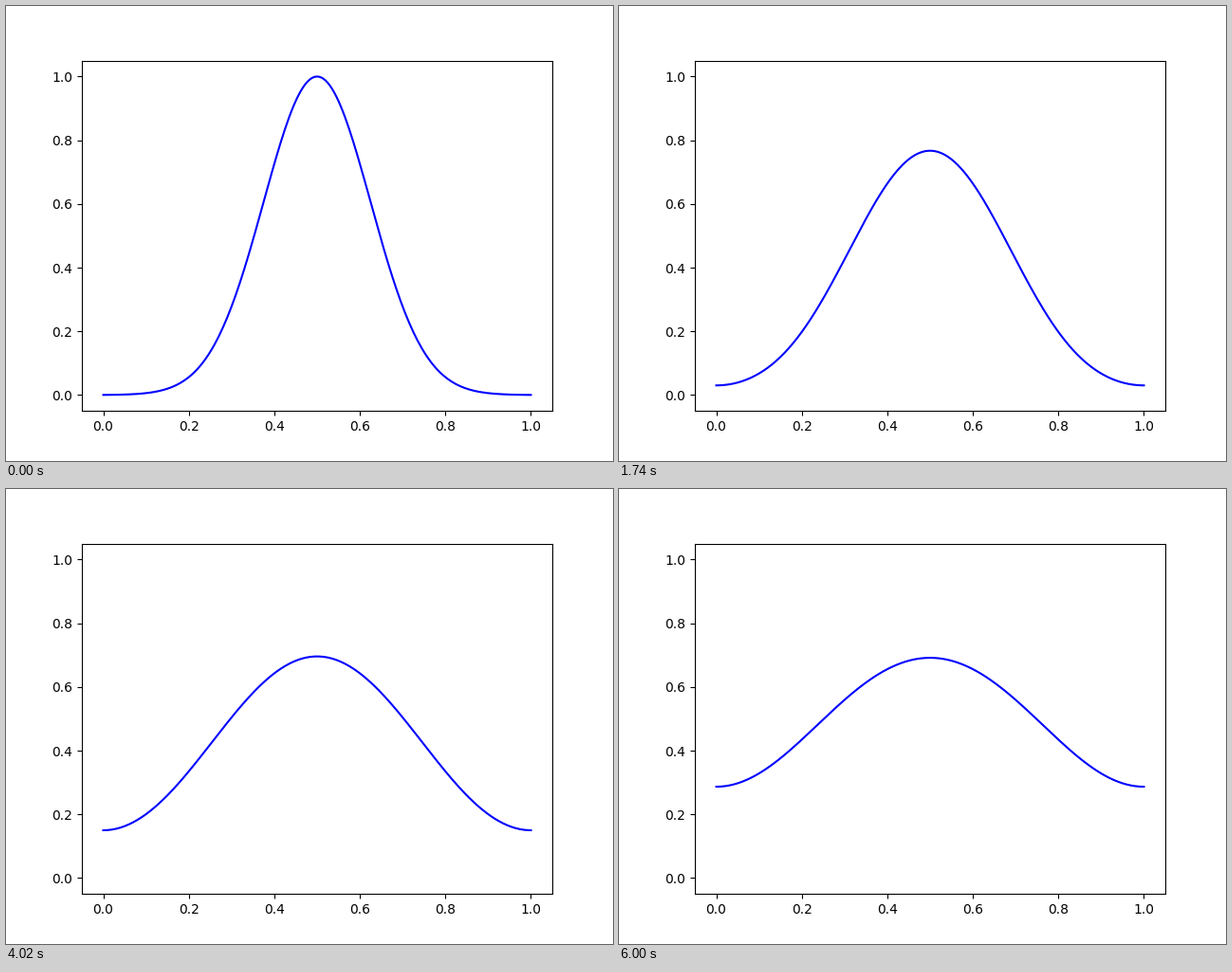
Animation of 640x480 px, one loop 6.06 s. Source, as a matplotlib script:

```python
import numpy as np
import matplotlib.pyplot as plt
from matplotlib.animation import FuncAnimation

FRAMES = 101
INTERVAL = 60            # ms
FRAME_TIME = 0.01        # model time per frame
SUBSTEPS = 25
DIFFUSION = 1 / (4 * np.pi ** 2)
GROWTH = 1.0
SIGMA = 0.125

x = np.linspace(0, 1, 201)
dx = x[1] - x[0]
dt = FRAME_TIME / SUBSTEPS


def advance(u):
    """One step of diffusion with logistic growth and no-flux walls."""
    p = np.pad(u, 1, mode="reflect")
    laplacian = (p[2:] - 2 * u + p[:-2]) / dx ** 2
    return u + dt * (DIFFUSION * laplacian + GROWTH * u * (1 - u))


def solve():
    u = np.exp(-(x - 0.5) ** 2 / (2 * SIGMA ** 2))
    states = [u]
    for _ in range(FRAMES - 1):
        for _ in range(SUBSTEPS):
            u = advance(u)
        states.append(u)
    return states


states = solve()

fig, ax = plt.subplots(figsize=(6.4, 4.8), dpi=100)
line, = ax.plot(x, states[0], color="blue", lw=1.5)
ax.set_xlim(-0.05, 1.05)
ax.set_ylim(-0.05, 1.05)


def update(i):
    line.set_ydata(states[i])
    return line,


anim = FuncAnimation(fig, update, frames=FRAMES, interval=INTERVAL,
                     repeat=True, repeat_delay=0)
plt.show()
```
